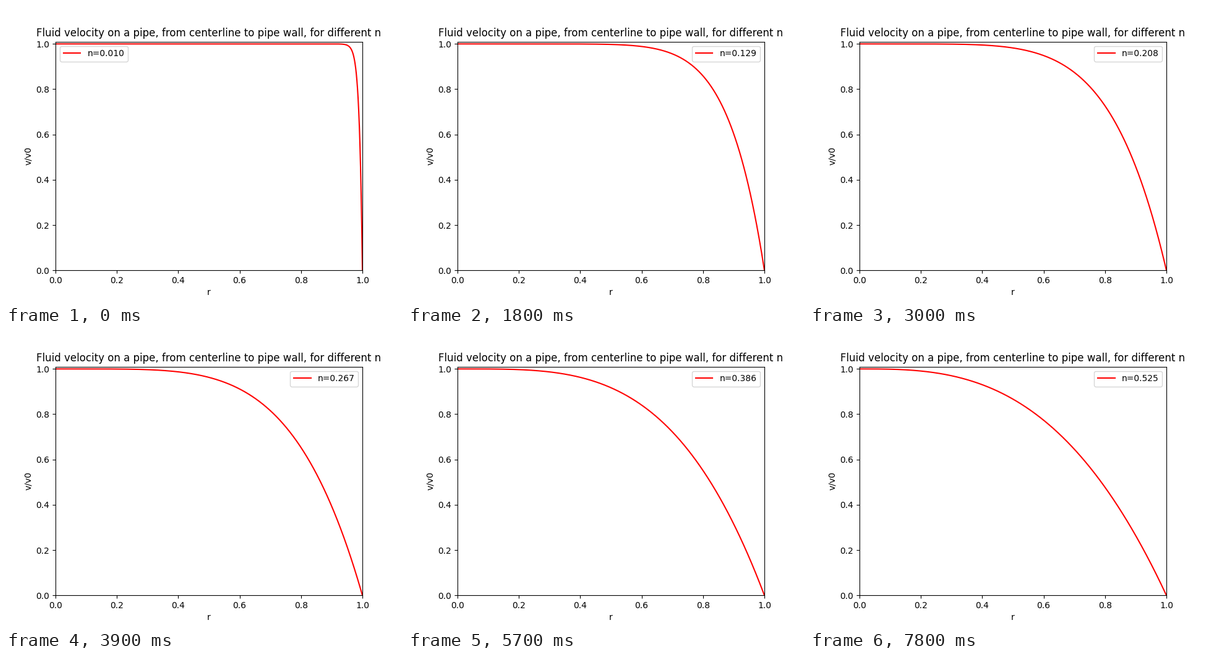
Write a matplotlib script that moves like this. It is 640 px wide and 480 px high and loops after 8 s.

```python
import numpy as np
import matplotlib.pyplot as plt
from matplotlib.animation import FuncAnimation

INTERVAL = 100       # ms per animation frame
FRAMES = 80
FRAMES_PER_STEP = 3  # each curve stays for 300 ms

exponents = np.linspace(0.01, 1, 51)
r = np.linspace(0, 1, 1000)

fig, ax = plt.subplots(figsize=(6.4, 4.8), dpi=100)
ax.set(xlim=(0, 1), ylim=(0, 1.01), xlabel="r", ylabel="v/v0")
ax.set_title("Fluid velocity on a pipe, from centerline to pipe wall, for different n")
line, = ax.plot([], [], color="red")


def update(frame):
    """Power-law velocity profile for the current flow index n."""
    n = exponents[frame // FRAMES_PER_STEP]
    line.set_data(r, 1 - r ** (1 / n + 1))
    line.set_label(f"n={n:.3f}")
    # "best" moves the legend out of the curve's way
    legend = ax.legend(loc="best")
    return line, legend


anim = FuncAnimation(fig, update, frames=FRAMES, interval=INTERVAL,
                     repeat=True, repeat_delay=0, blit=False)
plt.show()
```
